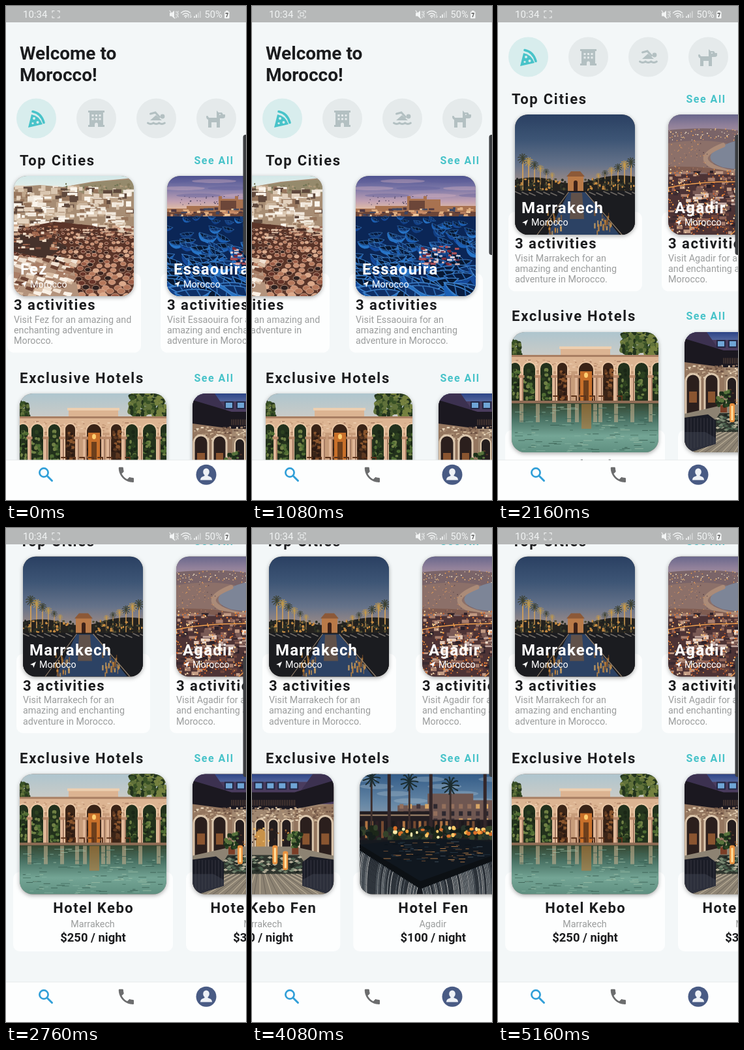
An HTML page that plays this animation: 368 px wide and 756 px high, repeating every 5.28 s.

```html
<!DOCTYPE html>
<html lang="en">
<head>
<meta charset="utf-8">
<title>Travel app</title>
<style>
  html, body { margin: 0; width: 100%; height: 100%; overflow: hidden; background: #f3f7f8; }
  svg { display: block; font-family: Roboto, sans-serif; }
  .shadow { filter: drop-shadow(0 2px 3px #0005); }
  .line { fill: none; stroke-linecap: round; }
</style>
</head>
<body>
<svg id="stage" width="368" height="756" viewBox="0 0 368 756"></svg>
<script>
let seed = 11;
const rnd = () => (seed = seed * 16807 % 2147483647) / 2147483647;
const between = (a, b) => a + rnd() * (b - a);
const pick = list => { const a = list.split(' '); return '#' + a[rnd() * a.length | 0]; };
const many = (n, f) => Array.from({ length: n }, (_, i) => f(i)).join('');

const rect = (x, y, w, h, fill, extra = '') =>
  `<rect x="${x}" y="${y}" width="${w}" height="${h}" fill="${fill}" ${extra}/>`;
const oval = (x, y, rx, ry, fill, extra = '') =>
  `<ellipse cx="${x}" cy="${y}" rx="${rx}" ry="${ry}" fill="${fill}" ${extra}/>`;
const path = (d, fill, extra = '') => `<path d="${d}" fill="${fill}" ${extra}/>`;
const line = (d, stroke, width = 1) =>
  `<path class="line" d="${d}" stroke="${stroke}" stroke-width="${width}"/>`;
const group = (x, y, body, extra = '') => `<g transform="translate(${x} ${y})" ${extra}>${body}</g>`;
const text = (x, y, size, fill, s, weight = 400, spacing = 0, anchor = 'start') =>
  `<text x="${x}" y="${y}" font-size="${size}" fill="${fill}" font-weight="${weight}"
    letter-spacing="${spacing}" text-anchor="${anchor}">${s}</text>`;
const fade = (id, ...colors) => `<linearGradient id="${id}" x2="0" y2="1">${colors.map((c, i) =>
  `<stop offset="${i / (colors.length - 1)}" stop-color="${c}"/>`).join('')}</linearGradient>`;
const wash = (id, y, w, h, ...colors) => fade(id, ...colors) + rect(0, y, w, h, `url(#${id})`);
const arch = (x, y, w, h, fill, extra) =>
  path(`M${x} ${y + h}V${y + w / 2}a${w / 2} ${w / 2} 0 0 1 ${w} 0V${y + h}z`, fill, extra);
// Scattered blocks or dots inside the box x0..x1, y0..y1.
const blocks = (n, x0, x1, y0, y1, w, h, colors) =>
  many(n, () => rect(between(x0, x1), between(y0, y1), between(w / 3, w), between(h / 3, h), pick(colors)));
const dots = (n, x0, x1, y0, y1, r, colors) =>
  many(n, () => oval(between(x0, x1), between(y0, y1), between(r / 2, r), between(r / 2, r), pick(colors)));
const palm = (x, top, base, size, trunk, leaf) =>
  rect(x - size / 9, top, size / 4.5, base - top, trunk) + many(11, i => {
    const dx = Math.cos(i * .571) * size, dy = Math.sin(i * .571) * size;
    return line(`M${x} ${top}q${dx * .6} ${dy - 2} ${dx} ${dy}`, leaf, size / 6);
  });

function fez() {
  return wash('fezSky', 0, 184, 30, '#d3e8e8', '#eef3ec') +
    path('M0 17L40 14 75 17 120 9 184 3V184H0z', '#a78d74') +
    path('M80 17L130 9 184 5V26L110 28z', '#958a6c') + dots(50, 80, 184, 12, 24, 2, '6f7353 b09a7a 847a5a') +
    many(260, i => rect(between(-6, 180), 14 + i * .25, between(4, 17), between(3, 10),
      pick('d9c6b0 f1e8dc fbf5ec bfa58a 96755c 5f483c e3d1bd'))) +
    path('M0 82L62 70 120 76 184 92V184H0z', '#5a3428') +
    many(16, row => many(32 - row, i => {
      const r = 2 + row * .28;
      return oval(i * r * 2.8 + between(-2, 2), 82 + row * 6.8 + between(-2, 2), r, r * .7,
        pick('b5785c dca98a 67352a 9d5e48 c88d70 3d241f 2f211f'), 'stroke="#e0b9a0" stroke-width=".7"');
    })) +
    path('M0 88L44 92 82 108 48 126 0 116z', '#46322b') +
    blocks(70, -4, 62, 72, 112, 11, 5, 'cda88c a2684d efdcc8 4a3028 7d4f3e') +
    blocks(40, 90, 184, 74, 96, 14, 4, 'e3c8b0 8e5a47 4a2d26 d3a98c') +
    path('M0 122L48 126 92 143 100 184H0z', '#b3937c') +
    many(80, () => path(`M${between(-8, 88)} ${between(120, 180)}l12 2-3 6-11-4z`, pick('f0e2d3 faf1e6 a87e66 6d4535 d9bda4')));
}

function essaouira() {
  const hull = 'M-22-4Q0 14 24-8Q15 12-2 13Q-18 10-22-4z';
  const inside = 'M-22-4Q2-13 24-8Q4 10-22-4z';
  return wash('essSky', 0, 184, 58, '#4d5290', '#7d78a8', '#c0a0b2', '#f5cd9c') +
    many(9, i => oval(i * 24, 8 + i % 3 * 11, 34, 3, i % 2 ? '#d3b0bf' : '#5c5c98', 'opacity=".4"')) +
    dots(34, 20, 120, 30, 46, 1, '3a3350') +
    path('M0 50H30V46H79V31H84V35H104V31H109V36H130V46H184V64H0z', '#a87250') +
    path('M82 38h24v14H82zM0 55h184v8H0z', '#6c4639') +
    blocks(70, 0, 180, 48, 62, 9, 4, 'e0ae80 4d3740 c98c67 3d4662 f0c79a') +
    rect(0, 62, 184, 122, '#0b2656') +
    many(100, i => {
      const s = .26 + i * .0095;
      return `<g transform="translate(${between(-6, 190)} ${64 + i * 1.22}) rotate(${between(-8, 42)}) scale(${s})">` +
        path(hull, pick('1b5fb4 2673c6 15499a 123f84')) +
        path(inside, pick('081d42 0e2f66 071833'), 'stroke="#3f83cc" stroke-width="1.2"') +
        line('M-8-7L0 3M6-9L12 0', '#2b68ae', 1.6) + '</g>';
    }) +
    blocks(60, 96, 154, 106, 134, 8, 4, 'a95058 e0b8b4 7c2c3c d5d2dd');
}

function marrakech() {
  return wash('marSky', 0, 184, 116, '#2a4062', '#3d5575', '#66738a', '#b19484') +
    path('M0 100Q30 92 60 101T120 100T184 95V184H0z', '#24221f') +
    rect(81, 94, 24, 25, '#b97a48') + path('M79 95L86 87H100L107 95z', '#8c5938') + arch(90, 101, 6, 18, '#3d2218') +
    many(6, i => palm(12 + i * 9, 68 + i * 5, 116, 7.5 - i * .7, '#d9a254', i % 2 ? '#c09a4a' : '#3c4030')) +
    many(6, i => palm(178 - i * 10, 74 + i * 4, 116, 7.5 - i * .7, '#d9a254', i % 2 ? '#c79a48' : '#3c4030')) +
    dots(70, 0, 78, 98, 116, 2.4, '2a2f25 4d4a32 c98d42 1d201e') + dots(70, 108, 184, 98, 116, 2.4, '2a2f25 4d4a32 c98d42 1d201e') +
    rect(0, 117, 184, 67, '#1b1c20') +
    many(14, i => line(`M${i < 7 ? i * 11 : 114 + (i - 7) * 11} ${118 + i % 3}l9 4`, '#6f6a65', 1.6)) +
    path('M82 119H108L160 184H50z', '#2c4264') +
    path('M86 120H103L106 160H84z', '#77573f', 'opacity=".7"') +
    many(50, i => rect(i % 2 ? between(46, 70) : between(118, 146), between(146, 180), between(1, 3), between(3, 11), pick('d7923c 8d5a2a e9b160'), 'opacity=".7"')) +
    line('M82 119L34 184M108 119L164 184', '#8f7c68', 1.2);
}

function agadir() {
  return wash('agaSky', 0, 184, 34, '#69678c', '#90809a', '#ac9398') +
    path('M0 24Q60 18 110 25L184 21V184H0z', '#7a6468') +
    path('M0 44Q50 36 90 44L60 90H0z', '#8c7069') +
    path('M184 30Q118 32 82 48Q46 68 84 81Q130 90 184 74z', '#7d8597') +
    path('M184 46Q138 50 106 65Q136 78 184 64z', '#a3a6ae', 'opacity=".45"') +
    line('M84 47Q36 66 74 82T184 79', '#ab8b78', 7) + line('M0 84Q60 82 100 93T184 90', '#7f5c51', 8) +
    path('M0 92Q80 90 184 94V184H0z', '#4d3335') +
    dots(150, 0, 184, 22, 40, 1, 'ffcb83 f4a34e fff0cf 8d6a68') + dots(60, 0, 60, 40, 88, 1, 'e9a05a b98469 5f484a') +
    blocks(240, -5, 182, 86, 180, 12, 6, '8d6256 3a2a30 a97f6e 2b2028 70463c c29a83') +
    blocks(70, 25, 170, 112, 146, 15, 7, 'e3c7b6 c3a79f f0dccb 7a5a55') +
    dots(430, 0, 184, 84, 184, 1.4, 'ffd590 f59b42 ee7b31 ffedc1 d9622a') +
    line('M0 112Q60 98 184 105M96 184Q130 152 184 141', '#f0a050', 1.5);
}

function poolPavilion() {
  const bays = [[-4, 18], [17, 20], [43, 20], [69, 17], [102, 24], [139, 18], [162, 20], [188, 22], [215, 18]];
  const columns = [15, 40, 65, 88, 100, 128, 136, 160, 185, 213];
  const garden = i => i < 3 || i > 5;
  return wash('poolSky', 0, 225, 60, '#aec5ce', '#dccfc2') +
    dots(150, 168, 225, -2, 34, 5, '395126 60713a 22331d 75813f') + dots(40, 0, 14, 14, 36, 4, '395126 60713a 28391f') +
    path('M0 37H75V24H151V37H225V66H0z', '#dcb492') + rect(0, 35, 225, 3, '#a87e62') + rect(73, 22, 80, 4, '#edcfb0') +
    rect(0, 60, 225, 50, '#c79c7a') +
    blocks(160, 0, 222, 42, 62, 5, 2, 'c59a78 edceb0 b2866a e2bd99') +
    bays.map(([x, w], i) => arch(x, 46, w, 64, garden(i) ? '#22311c' : '#3a2417', 'stroke="#ecc8a6" stroke-width="2"') +
      dots(26, x + 3, x + w - 3, 58, 102, 3.4, garden(i) ? '4f6c33 2d4120 1a2616 6f8044' : '5e3a22 2c1a12 8a552d')).join('') +
    rect(105, 60, 18, 46, '#c8702a') + rect(110, 74, 8, 33, '#6d3f1c') + oval(114, 66, 3, 4, '#ffcf70') +
    columns.map(x => rect(x - 3, 64, 6, 45, '#dfb697') + rect(x + 1, 68, 2, 40, '#a47a61') + rect(x - 4.5, 66, 9, 4, '#b98a6a')).join('') +
    many(8, i => line(`M${64 + i * 14} 98h7v8`, '#5b321a', 2)) + rect(0, 105, 225, 5, '#8f6c55') +
    wash('poolWater', 109, 225, 75, '#33452f', '#4a7365', '#74a595', '#5f8f80') +
    columns.map(x => rect(x - 3, 110, 6, 28, '#cdb592', 'opacity=".55"')).join('') +
    rect(107, 110, 15, 38, '#b87a39', 'opacity=".6"') +
    many(130, () => line(`M${between(0, 220)} ${between(114, 184)}h${between(3, 14)}`, pick('89b7a4 3a6355 a5c5ad 2f5146'), .7));
}

function courtyard() {
  const sofa = flip => `<g transform="translate(${flip ? 225 : 0} 0) scale(${flip ? -1 : 1} 1)">` +
    path('M0 131L36 126 48 135V171L8 184H0z', '#1a1c26') + path('M0 153H32L48 162V171L8 184H0z', '#2c2f3b') +
    many(10, i => line(`M${i * 5} 132v${48 - i}`, '#4b4c57', .6)) + '</g>';
  return rect(0, 0, 225, 184, '#a08770') + rect(0, 0, 225, 46, '#4a3c5e') + wash('yardSky', 0, 225, 12, '#2c4486', '#51649c') +
    path('M0 0H34L62 40H0zM225 0H193L164 40H225z', '#3c3150') +
    many(7, i => rect(50 + i * 18, 13, 12, 10, '#6fa5d6', 'stroke="#232744" stroke-width="2"')) +
    path('M0 10L60 28H165L225 10V42L164 54H61L0 48z', '#1b1820') +
    many(40, i => line(`M${60 + i * 2.7} 40v8`, '#5d473b', 1)) +
    path('M0 46L61 54V113L0 126zM225 46L164 54V113L225 126z', '#94765f') +
    blocks(320, 0, 222, 50, 72, 5, 3, 'ead8bd 6e5344 cfb596 a68a70') +
    [[2, 22], [31, 21], [172, 21], [201, 22]].map(([x, w]) => arch(x, 64, w, 62, '#2b1f1d', 'stroke="#dcc7ad" stroke-width="3"') + rect(x + 5, 91, w - 10, 17, '#8a5530')).join('') +
    many(5, i => arch(65 + i * 20, 69, 15, 45, '#241d1e', 'stroke="#e2ccb0" stroke-width="2"')) + arch(106, 84, 14, 30, '#c8924a') +
    dots(40, 64, 162, 82, 108, 2, 'c8863e 5a3a28 f0c070 3a2a26') +
    path('M0 125L62 111H164L225 125V184H0z', '#8d8373') + path('M54 124H172L193 153H35z', '#2f352e') +
    many(130, () => path(`M${between(46, 174)} ${between(126, 150)}l4-2 4 2-4 2z`, pick('b6b09a 4d6350 1d241f 7a8872'))) +
    many(34, i => line(`M${112 + (i - 17) * 4} 153L${112 + (i - 17) * 9} 184`, i % 2 ? '#c9bca3' : '#6b6459', 1)) +
    [60, 166].map(x => rect(x - 5, 112, 10, 11, '#7b3e27') + dots(34, x - 10, x + 10, 90, 113, 3.5, '2a4523 57723b 1c2f1a')).join('') +
    [73, 90, 135, 151].map((x, i) => rect(x - 4, 109 + i % 2 * 9, 8, 29, '#e8913f', 'rx="3"') + rect(x - 1.5, 113 + i % 2 * 9, 3, 22, '#ffe2a0')).join('') +
    sofa(false) + sofa(true);
}

function fountain() {
  return wash('fountainSky', 0, 225, 92, '#335c88', '#6788a6', '#aaaab0') +
    many(10, i => oval(i * 26, 8 + i % 4 * 11, 26, 4, '#a9bccb', 'opacity=".35"')) +
    path('M0 58H58V48H104V30H174V40H225V112H0z', '#6f5751') +
    many(52, i => rect(61 + i % 13 * 13, 46 + (i / 13 | 0) * 11, 6, 7, pick('2d282f d9a665 40343a 94705c'))) +
    path('M0 57H111V70H225V105H0z', '#221d21') + rect(0, 62, 108, 2, '#a4896e') +
    many(28, i => rect(i * 8.2, 72, 4, 26, pick('764b31 2c2024 af7442 1c181c'))) +
    [18, 45, 76, 109, 139, 192].map((x, i) => i % 2 ? rect(x - 2.5, 0, 5, 100, '#33272a') : palm(x, 6 + i * 3, 100, 13, '#3d2f2d', '#1b2c30')).join('') +
    dots(120, 0, 225, 82, 102, 6, '1c2719 34422a 141d1a 26332a') +
    dots(34, 36, 205, 82, 97, 3.4, 'ff9f37 ffc967 ffeca9 d9702a') +
    rect(0, 101, 225, 83, '#15191f') +
    path('M0 108L75 100H165L225 107V128L93 176L0 119z', '#10171f') +
    many(90, () => line(`M${between(35, 190)} ${between(103, 136)}h${between(3, 12)}`, pick('a97543 3d4c5a 22323f 6a4a32 0c1218'), 1)) +
    many(44, i => line(`M${i * 2.1} ${114 + i * 1.28}q-8 17-6 70`, pick('bac3c7 7d8890 e2e6e6 4d565e'), 1)) +
    many(60, i => line(`M${94 + i * 2.25} ${170 - i * .85}q8 17 7 70`, pick('bac3c7 7d8890 e2e6e6 4d565e'), 1)) +
    path('M0 108L93 164L225 117V125L93 176L0 117z', '#0c1014');
}

const ink = '#1b1c1e', soft = '#9b9d9d', gray = '#b3c0c2', teal = '#48c3c9';
const arrow = (x, y) => path(`M${x} ${y + 4.5}L${x + 9} ${y}L${x + 5.2} ${y + 9.5}L${x + 4.2} ${y + 5.4}z`, '#fff');
const card = (w, imageWidth, imageTop, panelTop, photo, clip) =>
  rect(0, panelTop, w, 121.5, '#fdfefe', 'rx="10"') +
  rect(10, imageTop, imageWidth, 184, '#8a8078', 'rx="20" class="shadow"') +
  group(10, imageTop, photo, `clip-path="url(#${clip})"`);

const cityCard = ([name, photo, ...lines], i) => group(11 + i * 235, 0,
  card(205, 184, 260, 409, photo(), 'cityClip') +
  text(20, 411, 24, '#fff', name, 700, 1.2) + arrow(21, 421) + text(35, 430.5, 14.3, '#fff', 'Morocco') +
  text(10, 465, 22, ink, '3 activities', 600, 1.5) +
  lines.map((s, k) => text(10, 484.7 + k * 16.2, 14.3, soft, s)).join(''));
const hotelCard = ([name, photo, city, price], i) => group(11 + i * 265, 0,
  card(245, 225, 593, 743, photo(), 'hotelClip') +
  text(123.2, 805.5, 22, ink, name, 600, 1.5, 'middle') +
  text(122, 827, 14.3, soft, city, 400, 0, 'middle') +
  text(122.5, 849.5, 18.4, ink, `$${price} / night`, 600, 0, 'middle'));

const cities = [
  ['Fez', fez, 'Visit Fez for an amazing and', 'enchanting adventure in', 'Morocco.'],
  ['Essaouira', essaouira, 'Visit Essaouira for an', 'amazing and enchanting', 'adventure in Morocco.'],
  ['Marrakech', marrakech, 'Visit Marrakech for an', 'amazing and enchanting', 'adventure in Morocco.'],
  ['Agadir', agadir, 'Visit Agadir for an amazing', 'and enchanting adventure in', 'Morocco.'],
];
const hotels = [
  ['Hotel Kebo', poolPavilion, 'Marrakech', 250],
  ['Hotel Kebo Fen', courtyard, 'Marrakech', 300],
  ['Hotel Fen', fountain, 'Agadir', 100],
];

const categories =
  many(4, i => oval(46.5 + i * 92, 172, 30.5, 30.5, i ? '#e5eaeb' : '#d8eded')) +
  path('M34 186L39 166Q51 168 56 181z', teal) + line('M41 161.5Q54 164 58 178.5', teal, 3.6) +
  oval(43, 172, 2, 2, '#d8eded') + oval(48.5, 178, 2, 2, '#d8eded') + oval(41, 179.5, 1.6, 1.6, '#d8eded') +
  path('M126 160h25v3h-2v19h2v3h-10v-4a2.5 2.5 0 0 0-5 0v4h-10v-3h2v-19h-2z', gray) +
  many(6, i => rect(131.5 + i % 3 * 5.5, 166 + (i / 3 | 0) * 5.5, 3, 3, '#e5eaeb')) +
  oval(240, 169, 3.4, 3.4, gray) + line('M221.5 165l7.5-2 6.5 7', gray, 3) + path('M221 175l9-8 9 8z', gray) +
  line('M217.5 179q4.3 3 8.6 0q4.3 3 8.6 0q4.3 3 8.6 0', gray, 3) +
  path('M323 160l3 3h5l2 3h3v3q0 3-4 3h-4v14h-5v-8h-8v8h-5v-12q-3-1-3-5q1-2 3 0q0 2 3 2h10z', gray) + oval(328, 166, 1, 1, '#e5eaeb');
const heading = (y, s) => text(21, y, 22, ink, s, 600, 1.75) + text(288.5, y - 2, 16, teal, 'See All', 600, 1.5);

const light = '#f1f3f3';
const statusBar = rect(0, 0, 368, 25, '#b6b8b8') + text(26, 18, 15, light, '10:34') +
  line('M71 10V7.5h3M79 7.5h3V10M82 15.5V18h-3M74 18h-3v-2.5', light, 1.1) +
  `<g id="capture">${rect(74, 10.3, 5, 5, 'none', `stroke="${light}"`)}</g>` +
  path('M251 10.5h3l4-3.5v12l-4-3.5h-3z', light) + line('M251 7l8 12M261 8v2M261 12v2M261 16v2M264 8l-1 2 1 2-1 2 1 3', light, 1.1) +
  line('M268.5 10.5q7-6 14 0M271 13q4.5-3.5 9 0M273.5 15.5q2-1.5 4 0', light, 1.4) + oval(275.5, 17.3, 1.1, 1.1, light) +
  line('M280 18v-5l-1.5 2M283 13v5l1.5-2', light, .9) +
  many(4, i => rect(288 + i * 3, 15.5 - i * 2.6, 1.8, 2.5 + i * 2.6, light, `opacity="${i < 2 ? 1 : .45}"`)) +
  text(304.5, 18, 14.6, light, '50%') + rect(335, 8.5, 7.5, 10.5, light, 'rx="1"') + rect(337, 7, 3.5, 2, light) +
  path('M336.5 10.5h4.5l-2.2 6.5h-1.3l1.8-5h-2.8z', '#555');

const navBar = rect(0, 695, 368, 61, '#fdfefe') + rect(0, 694.5, 368, .8, '#e3e7e8') +
  `<circle class="line" cx="58" cy="714" r="6.6" stroke="#319fd8" stroke-width="2.7"/>` + line('M63.5 719.5l7 7', '#319fd8', 3) +
  `<g transform="translate(168.9 701.9) scale(1.29)">` + path('M6.62 10.79c1.44 2.83 3.76 5.14 6.59 6.59l2.2-2.2c.27-.27.67-.36 1.02-.24 1.12.37 2.33.57 3.57.57.55 0 1 .45 1 1V20c0 .55-.45 1-1 1-9.39 0-17-7.61-17-17 0-.55.45-1 1-1h3.5c.55 0 1 .45 1 1 0 1.25.2 2.45.57 3.57.11.35.03.74-.25 1.02z', '#6c6d6e') + '</g>' +
  oval(307, 717.3, 15.5, 15.5, '#495b84') + oval(307, 713, 4.8, 5.6, '#eef1f6') +
  path('M298 725.5q0-4 3.5-5.2l3-1.3v-3h5v3l3 1.3q3.5 1.2 3.5 5.2z', '#eef1f6');

document.getElementById('stage').innerHTML =
  `<clipPath id="cityClip">${rect(0, 0, 184, 184, '#000', 'rx="20"')}</clipPath>
   <clipPath id="hotelClip">${rect(0, 0, 225, 184, '#000', 'rx="20"')}</clipPath>` +
  rect(0, 0, 368, 756, '#f3f7f8') +
  `<g id="page">${text(21, 82, 28, ink, 'Welcome to', 700)}${text(21, 115, 28, ink, 'Morocco!', 700)}
   ${categories}${heading(244, 'Top Cities')}<g id="cities">${cities.map(cityCard).join('')}</g>
   ${heading(576.5, 'Exclusive Hotels')}<g id="hotels">${hotels.map(hotelCard).join('')}</g></g>` +
  navBar + statusBar + rect(363.5, 197, 12, 184, '#3b3d40', 'rx="4"');

// Scroll offsets as [ms, px] stops, eased between neighbours.
const tracks = {
  cities: [[0, 9], [600, 97], [1080, 97], [1500, 572], [1620, 572], [1820, 465]],
  page: [[1860, 0], [2520, 216.5]],
  hotels: [[2820, 0], [3480, 172], [3640, 172], [4254, 437], [4440, 437], [5040, 0]],
};
const at = (stops, t) => {
  const i = stops.findIndex(s => s[0] > t);
  if (i < 1) return stops[i ? stops.length - 1 : 0][1];
  const [t0, a] = stops[i - 1], [t1, b] = stops[i], u = (t - t0) / (t1 - t0);
  return a + (b - a) * u * u * (3 - 2 * u);
};
const $ = id => document.getElementById(id);
const start = performance.now();
function draw() {
  const t = (performance.now() - start) % 5280;
  for (const id of ['cities', 'hotels'])
    $(id).setAttribute('transform', `translate(${-at(tracks[id], t)} 0)`);
  $('page').setAttribute('transform', `translate(0 ${-at(tracks.page, t)})`);
  const blink = t % 1500;
  $('capture').style.display = blink >= 720 && blink < 1240 ? '' : 'none';
  requestAnimationFrame(draw);
}
draw();
</script>
</body>
</html>
```
